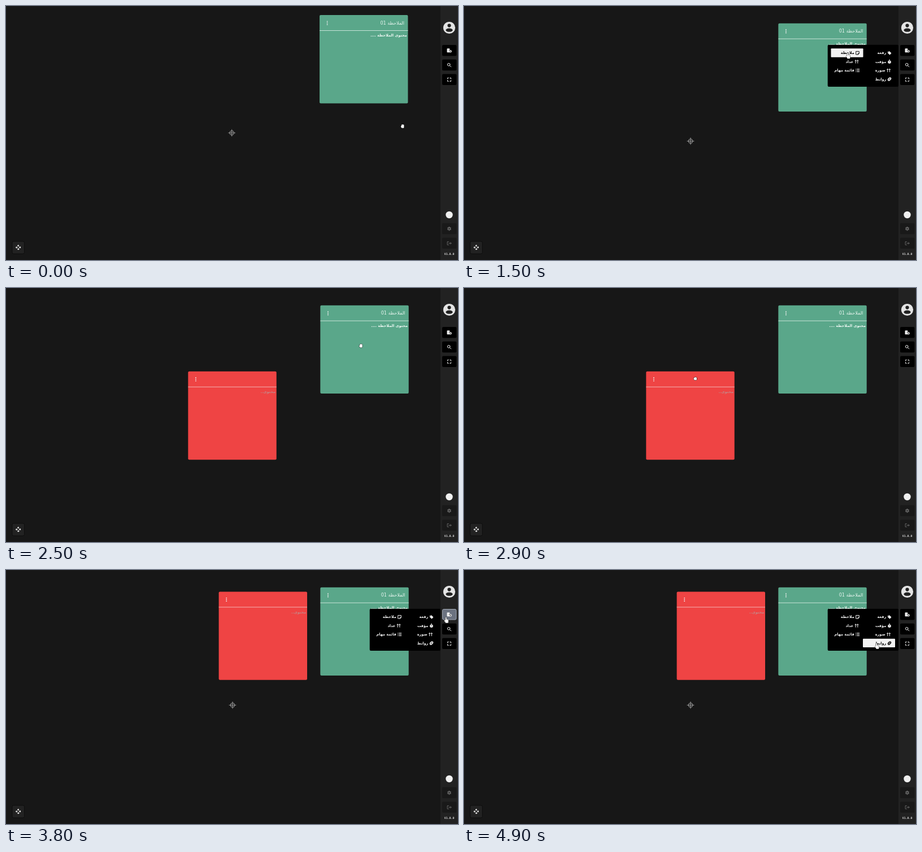
An HTML page with a canvas that plays this animation: 800x450 px, repeating every 5 s.

```html
<!DOCTYPE html>
<html lang="ar">
<head>
<meta charset="utf-8">
<title>لوحة الملاحظات</title>
<style>
  html, body { margin: 0; width: 100%; height: 100%; overflow: hidden; background: #171717; }
  canvas { display: block; width: 800px; height: 450px; }
</style>
</head>
<body>
<canvas id="stage" width="800" height="450"></canvas>
<script>
const ctx = document.getElementById('stage').getContext('2d');
const LOOP = 5000, STEP = 100;
const FONT = '"DejaVu Sans", "Noto Sans", sans-serif';
const WHITE = '#f2f2f2';
const CARD = 156.4, BUTTON_X = 772, BUTTON_GAP = 25.8;

// ---- Motion ----

const stop = (t, x, y) => ({ t, x, y });
const noteDrag = [stop(2900, 322.3, 147.8), stop(3100, 361.2, 46.2), stop(3200, 402, 30.5), stop(3400, 376.6, 38.4)];
const trip = [
  stop(500, 703, 228), stop(600, 640, 279), stop(900, 795, 90),
  stop(1500, 680, 88), stop(2100, 735, 131), stop(2400, 683, 88), stop(2900, 409.5, 160),
  stop(3400, 458, 57), stop(3600, 640, 237), stop(3700, 794, 89), stop(3800, 779.5, 88.5),
  stop(4200, 690, 95), stop(4900, 731, 134.5)
];

const clamp = v => Math.max(0, Math.min(1, v));
const mix = (a, b, f) => a + (b - a) * f;
const between = (t, a, b) => t >= a && t < b;
const inside = (p, x, y, w, h) => p.x >= x && p.x <= x + w && p.y >= y && p.y <= y + h;

function along(stops, t) {
  const b = stops.find(s => s.t > t) || stops[stops.length - 1];
  const a = stops[Math.max(0, stops.indexOf(b) - 1)];
  const f = clamp((t - a.t) / (b.t - a.t || 1));
  return { x: mix(a.x, b.x, f), y: mix(a.y, b.y, f) };
}

function panAt(t) {
  const f = clamp(t / 400), sway = Math.sin(Math.PI * f);
  return { x: 1.3 * f - 9 * sway, y: 14.6 * f + 30 * sway };
}

function cursorAt(t, pan, note) {
  if (t < 500) return { x: 702 + pan.x, y: 213 + pan.y };
  if (between(t, 3000, 3400)) return { x: note.x + 81, y: note.y + 18.8 };
  return along(trip, t);
}

// ---- Drawing helpers ----

function box(x, y, w, h, r, fill, border) {
  ctx.beginPath();
  ctx.roundRect(x, y, w, h, r);
  ctx.fillStyle = fill;
  ctx.fill();
  if (border) { ctx.strokeStyle = border; ctx.lineWidth = 1; ctx.stroke(); }
}

function disc(x, y, r, fill) {
  ctx.beginPath();
  ctx.arc(x, y, r, 0, Math.PI * 2);
  ctx.fillStyle = fill;
  ctx.fill();
}

function ring(x, y, r) {
  ctx.beginPath();
  ctx.arc(x, y, r, 0, Math.PI * 2);
  ctx.stroke();
}

function line(...points) {
  ctx.beginPath();
  points.forEach(([x, y]) => ctx.lineTo(x, y));
  ctx.stroke();
}

function turns(n, paint) {
  for (let i = 0; i < n; i++) {
    paint();
    ctx.rotate(Math.PI * 2 / n);
  }
}

function text(s, x, y, size, fill, weight = 'normal') {
  ctx.font = `${weight} ${size}px ${FONT}`;
  ctx.direction = 'rtl';
  ctx.textAlign = 'right';
  ctx.fillStyle = fill;
  ctx.fillText(s, x, y);
}

// ---- Icons, each centred on the origin ----

const icons = {
  add(color) {
    box(-4, -3.6, 4.8, 7, 0.7, color);
    disc(2, 1.4, 2.3, color);
    ctx.lineWidth = 0.6;
    ctx.strokeStyle = '#222';
    turns(4, () => line([2, 1.4].map(() => 0), [0, 0]));
    line([0.8, 1.4], [3.2, 1.4]);
    line([2, 0.2], [2, 2.6]);
  },
  search() {
    ring(-0.8, -0.8, 2.3);
    line([1, 1], [3.3, 3.3]);
  },
  expand() { turns(4, () => line([-3, -1.2], [-3, -3], [-1.2, -3])); },
  exit() {
    line([-1, -2.8], [-3.4, -2.8], [-3.4, 2.8], [-1, 2.8]);
    line([-1, 0], [3.4, 0]);
    line([1.8, -1.7], [3.5, 0], [1.8, 1.7]);
  },
  move() {
    turns(4, () => {
      line([0, -1.4], [0, -3.8]);
      line([-1.2, -3], [0, -4.4], [1.2, -3], [-1.2, -3]);
    });
  },
  gear(color) {
    ctx.lineWidth = 1.7;
    ring(0, 0, 1.9);
    turns(6, () => box(-0.8, -3.6, 1.6, 1.4, 0.2, color));
  },
  tag(color) {
    box(-3, -2.8, 3.2, 3.2, 0.5, color);
    ctx.rotate(Math.PI / 4);
    box(-2.2, -2.2, 5, 4.4, 0.6, color);
    disc(-2.2, 0, 0.6, '#000');
  },
  watch(color) {
    disc(0, 0.6, 2.8, color);
    box(-1, -3.6, 2, 1, 0.2, color);
    box(-0.35, -1, 0.7, 2, 0, '#000');
  },
  arrows() {
    for (const x of [-1.8, 1.8]) {
      line([x, 2.8], [x, -2.6]);
      line([x - 1.3, -1.4], [x, -2.8], [x + 1.3, -1.4]);
    }
  },
  clip() {
    ctx.rotate(Math.PI / 4);
    for (const r of [1.9, 0.9]) {
      ctx.beginPath();
      ctx.roundRect(-r, -r - 1.4, r * 2, r * 2 + 2.8, r);
      ctx.stroke();
    }
  },
  note() {
    line([2.8, 0.9], [2.8, -2.8], [-2.8, -2.8], [-2.8, 2.8], [0.9, 2.8], [2.8, 0.9], [0.9, 0.9], [0.9, 2.8]);
  },
  list() {
    for (const y of [-2.3, 0, 2.3]) {
      line([-1.2, y], [3.2, y]);
      line([-3.2, y], [-2.8, y]);
    }
  }
};

function icon(name, x, y, color = WHITE) {
  ctx.save();
  ctx.translate(x, y);
  ctx.lineWidth = 1;
  ctx.lineCap = ctx.lineJoin = 'round';
  ctx.strokeStyle = color;
  icons[name](color);
  ctx.restore();
}

// ---- Parts ----

function drawCrosshair(x, y) {
  ctx.strokeStyle = '#bdbdbd';
  ctx.lineWidth = 0.8;
  ring(x, y, 3.8);
  line([x - 6.3, y], [x + 6.3, y]);
  line([x, y - 6.3], [x, y + 6.3]);
}

function drawCard({ x, y }, { fill, rule, title, body, ink }) {
  box(x, y, CARD, CARD, 2, fill);
  ctx.fillStyle = rule;
  ctx.fillRect(x, y + 27, CARD, 0.9);
  for (const d of [-2.8, 0, 2.8]) disc(x + 13.6, y + 14 + d, 0.9, WHITE);
  text(title, x + 150, y + 16.6, 8, '#e8f5ef');
  text(body, x + 154.6, y + 38.2, 6.5, ink, 'bold');
}

const greenNote = { fill: '#5aa78a', rule: '#d4eae1', title: 'الملاحظة 01', body: 'محتوى الملاحظة ....', ink: '#eef8f3' };
const redNote = { fill: '#ef4444', rule: '#f3bcbc', title: '', body: 'محتوى..', ink: '#c58585' };

function drawAvatar(x, y) {
  disc(x, y, 10.6, '#e4e4e4');
  disc(x, y - 3.9, 3.1, '#222');
  ctx.beginPath();
  ctx.ellipse(x, y + 4.2, 6.1, 3.1, 0, 0, Math.PI * 2);
  ctx.fill();
}

function drawButtons(top, names, fill, color) {
  names.forEach((name, i) => {
    const y = top + i * BUTTON_GAP;
    box(BUTTON_X, y, 25.4, 19.4, 2, fill);
    icon(name, 784.5, y + 9.8, color);
  });
}

function drawSidebar(hover) {
  ctx.fillStyle = '#222';
  ctx.fillRect(769, 0, 31, 450);
  drawAvatar(784.5, 38.5);
  drawButtons(69, ['add', 'search', 'expand'], '#000', WHITE);
  if (hover) {
    box(772.5, 69.5, 24.5, 18.5, 2, '#6b7280', '#a7adb8');
    icon('add', 784.5, 78.8);
  }
  disc(784.5, 370, 6.2, '#f0f0f0');
  drawButtons(384.8, ['gear', 'exit'], '#191919', '#666');
  ctx.font = 'bold 4.9px "DejaVu Sans Mono", monospace';
  ctx.direction = 'ltr';
  ctx.textAlign = 'center';
  ctx.fillStyle = '#e0e0e0';
  ctx.fillText('V1.0.0', 784.6, 441.2);
}

const menu = { x: 643.7, y: 68.8, w: 125.3, h: 74.2 };
const columns = [
  { x: 706, items: [['رقعة', 'tag'], ['مؤقت', 'watch'], ['صورة', 'arrows'], ['روابط', 'clip']] },
  { x: 649.5, items: [['ملاحظة', 'note'], ['عداد', 'arrows'], ['قائمة مهام', 'list']] }
];

function drawMenu(tip) {
  box(menu.x, menu.y, menu.w, menu.h, 2, '#000');
  for (const { x, items } of columns) {
    items.forEach(([label, name], row) => {
      const y = 83.2 + row * 15.45;
      const active = inside(tip, x, y - 7.7, 57, 15.4);
      if (active) box(x, y - 7.9, 57, 15.4, 1, '#f3f3f3');
      const color = active ? '#111' : WHITE;
      const right = x + (name === 'arrows' ? 39.7 : 41.2);
      icon(name, right + 5.8, y, color);
      text(label, right, y + 2.2, 6.5, color, 'bold');
    });
  }
}

function handShape(kind) {
  const hand = new Path2D();
  const pointing = kind === 'pointer';
  const reach = kind === 'grab' ? 3.4 : 2.2;
  if (pointing) {
    hand.roundRect(-1.7, -5, 1.8, 7, 0.9);
    hand.roundRect(-2, -1, 5.4, 6.2, 1.3);
    hand.roundRect(-3.7, 0.3, 2.6, 2.6, 1);
  } else {
    for (let i = 0; i < 4; i++) hand.roundRect(-2.2 + i * 1.1, -reach + Math.abs(i - 1.5) * 0.4, 1.3, 4, 0.6);
    hand.roundRect(-2.2, -0.8, 4.6, 4, 1.3);
    hand.roundRect(-3.1, -0.3, 1.8, 2.2, 0.8);
  }
  return hand;
}

function drawCursor({ x, y }, kind) {
  const hand = handShape(kind);
  ctx.save();
  ctx.translate(x, y);
  ctx.lineWidth = 1;
  ctx.strokeStyle = '#111';
  ctx.stroke(hand);
  ctx.fillStyle = '#fff';
  ctx.fill(hand);
  ctx.restore();
}

function draw(t) {
  const pan = panAt(t);
  const note = along(noteDrag, t);
  const cursor = cursorAt(t, pan, note);
  const tip = { x: cursor.x - 0.8, y: cursor.y - 5 };
  const menuOpen = between(t, 1000, 2500) || t >= 3800;
  const dragging = between(t, 100, 500) || between(t, 2900, 3500);
  const onButton = inside(tip, BUTTON_X, 69, 26, 19.4);
  const onMenu = menuOpen && inside(tip, menu.x, menu.y, menu.w + 3, menu.h);

  ctx.fillStyle = '#171717';
  ctx.fillRect(0, 0, 800, 450);
  drawCrosshair(399.7 + pan.x, 224.8 + pan.y);
  drawCard({ x: 555 + pan.x, y: 16.1 + pan.y }, greenNote);
  if (t >= 2500) drawCard(note, redNote);
  box(11, 417, 21.5, 22, 2.5, '#222', '#0d0d0d');
  icon('move', 21.7, 427.7);
  drawSidebar(onButton);
  if (menuOpen) drawMenu(tip);
  drawCursor(cursor, onButton || onMenu ? 'pointer' : dragging ? 'grabbing' : 'grab');
}

const start = performance.now();
function tick() {
  const t = (performance.now() - start) % LOOP;
  draw(Math.floor(t / STEP) * STEP);
  requestAnimationFrame(tick);
}
tick();
</script>
</body>
</html>
```
